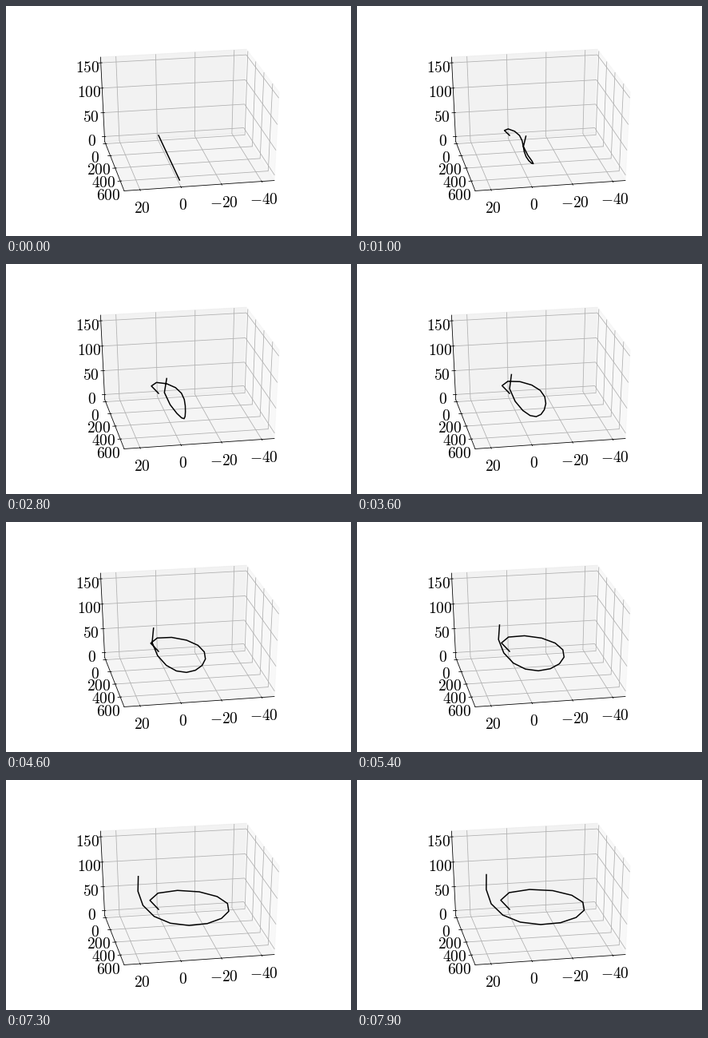
Recreate the animation shown at these times as a matplotlib script. Size 432x288 px, loop 8000 ms.

```python
import numpy as np
import matplotlib.pyplot as plt
from matplotlib.animation import FuncAnimation
from matplotlib.lines import Line2D
from matplotlib.ticker import MultipleLocator
from matplotlib.transforms import Affine2D

W, H, DPI = 432, 288, 72
FRAMES, STEP = 80, 100
T_FOLD, T_END = 2.0, 7.9  # line fully folded, loop fully open (s)
JOINTS = 16

plt.rcParams.update({"mathtext.fontset": "cm", "font.size": 19.5})

fig = plt.figure(figsize=(W / DPI, H / DPI), dpi=DPI)
ax = fig.add_axes([0.126, 0.116, 0.775, 0.77], projection="3d")
ax.apply_aspect = lambda position=None: None  # fill the wide panel
ax.set_box_aspect((1, 0.94, 1), zoom=0.928)
ax.view_init(elev=30, azim=79.5)

for axis, gap in ((ax.xaxis, 20), (ax.yaxis, 200), (ax.zaxis, 50)):
    axis.set_major_locator(MultipleLocator(gap))
    axis.set_major_formatter("${x:g}$")
ax.set(xlim=(-46.3, 27.7), ylim=(-36, 746), zlim=(-10.9, 160.9))

# Stage pixels, y down; a pose is a smooth curve through a few joints
START, TIP = np.array([191, 162]), np.array([217.3, 218])
KNOTS = (1, 2, 4, 7, 10, 13, 15)
FOLDED = np.array([(182.5, 153.3), (188, 150), (205, 158.5), (211, 181),
                   (221.5, 196.5), (214, 181), (210, 149)])
OPEN = np.array([(180, 150.5), (190.5, 141), (245, 138.5), (284.5, 163),
                 (230, 181), (168, 155), (162, 118.5)])


def curve(points):
    """Polynomial through the knots, read at every joint after the first."""
    i = np.arange(1, JOINTS)
    return sum(np.outer(np.prod([(i - b) / (a - b) for b in KNOTS if b != a], 0), p)
               for a, p in zip(KNOTS, points))


straight = START + np.outer(np.arange(1, JOINTS) / (JOINTS - 1), TIP - START)
folded, opened = curve(FOLDED), curve(OPEN)


def pose(t):
    """The straight line folds quickly, then opens ever more slowly."""
    hold = max(0, 1 - t / T_FOLD) ** 2.3
    grow = np.log2(1 + max(0, (t - T_FOLD) / (T_END - T_FOLD)))
    joints = folded + grow * (opened - folded) + hold * (straight - folded)
    return np.vstack([START, joints])


to_stage = Affine2D().scale(1, -1).translate(0, H)
chain = fig.add_artist(Line2D([], [], color="black", lw=1.5, transform=to_stage))


def draw(i):
    chain.set_data(*pose(i * STEP / 1000).T)
    return (chain,)


anim = FuncAnimation(fig, draw, frames=FRAMES, interval=STEP,
                     repeat=True, repeat_delay=0)
plt.show()
```
